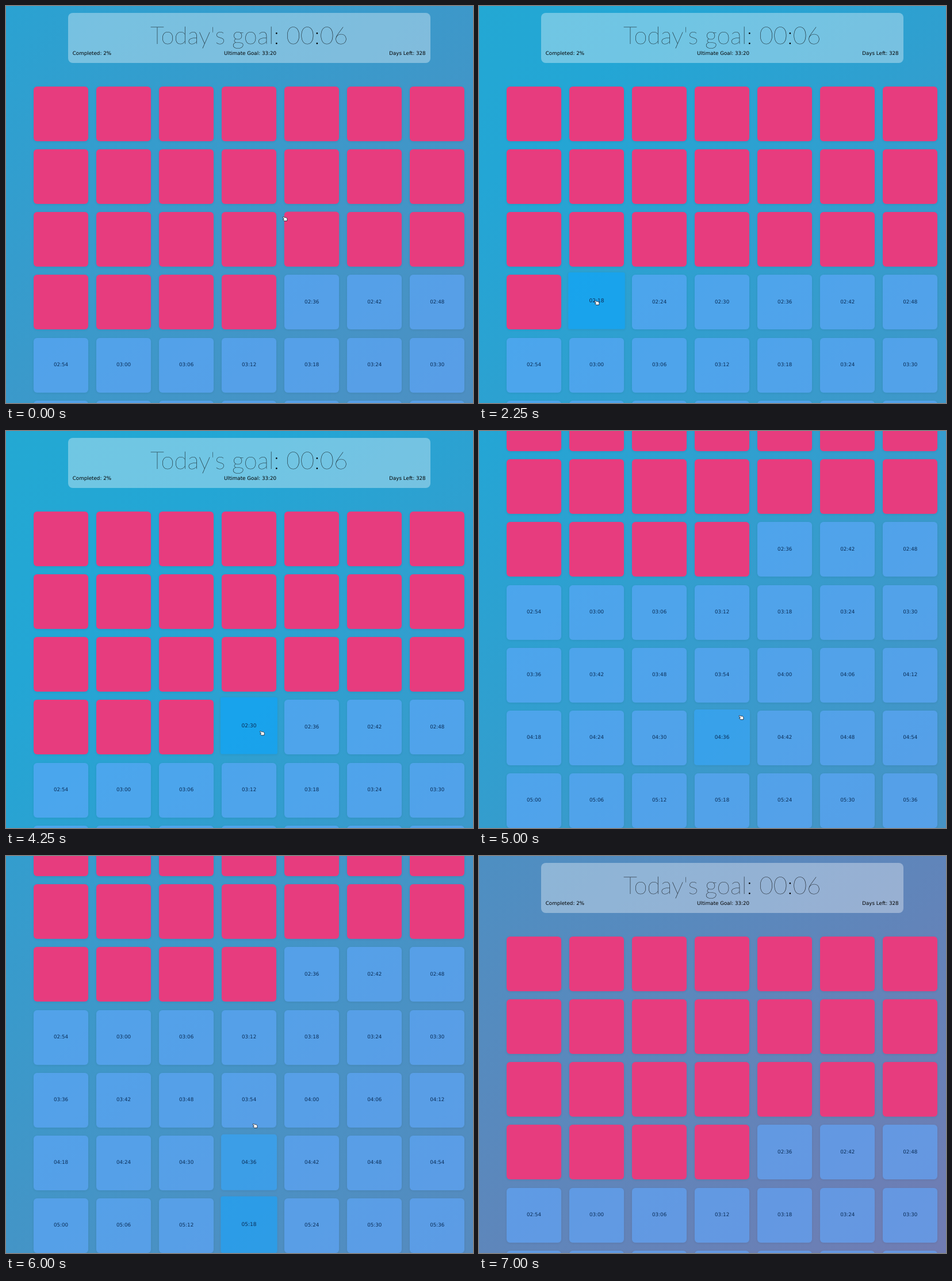
An HTML page for the animation above (7.25 s loop, 812x690 px).

```html
<!DOCTYPE html>
<html lang="en">
<head>
<meta charset="utf-8">
<title>Goal tracker</title>
<style>
  html, body { margin: 0; width: 100%; height: 100%; overflow: hidden; }
  #stage {
    position: relative; width: 812px; height: 690px; overflow: hidden;
    background: linear-gradient(-45deg, #ee7752, #e73c7e, #23a6d5, #23d5ab);
    background-size: 3380px 21560px;
    font: 8.75px "DejaVu Sans", sans-serif; text-rendering: geometricPrecision;
  }
  #page { position: absolute; inset: 0; }
  header {
    position: absolute; left: 107.7px; top: 11.5px; width: 630px; height: 87.6px;
    border-radius: 8px; background: rgba(255, 255, 255, .35); color: #000;
  }
  h1 {
    position: absolute; top: 12px; width: 100%; margin: 0; text-align: center;
    font: 100 42px/52.5px Lato, sans-serif;
  }
  .stats {
    position: absolute; left: 8px; right: 8px; top: 66.5px; line-height: 10px;
    display: flex; justify-content: space-between;
  }
  .tile {
    position: absolute; width: 95px; height: 95px; border-radius: 6px;
    display: flex; align-items: center; justify-content: center;
    color: #0a2d57; box-shadow: 0 1px 4px rgba(0, 0, 0, .07);
  }
  #cursor { position: absolute; left: 0; top: 0; }
</style>
</head>
<body>
<div id="stage">
  <div id="page">
    <header>
      <h1>Today's goal: 00:06</h1>
      <div class="stats"><span>Completed: 2%</span><span>Ultimate Goal: 33:20</span><span>Days Left: 328</span></div>
    </header>
  </div>
  <svg id="cursor" width="10" height="10">
    <path d="M1 2.2 Q1.2 1.2 2.4 1.6 L4.4 2.6 L7 2.6 Q9 3.6 9 5.5 L8.6 8.6 L4 8.6 L1.3 6.2 L3.4 5.6 Z"
      fill="#fff" stroke="#1d2a3a" stroke-width=".9" stroke-linejoin="round"/>
  </svg>
</div>
<script>
const LOOP = 7250, STEP = 250, COLUMNS = 7, DONE = 25;
const LEFT = 48, TOP = 140.3, PITCH = 109.05, SIZE = 95;
const FADE = 250, SCROLL = 309, SCROLL_START = 4600, SCROLL_END = 4930;
const PAUSE = 6000, RETURN = 6750, SKIPPED = 1900;
const TURN = 4400, HALF_CYCLE = 7500, TRAVEL = 2535;
const stage = document.getElementById('stage');
const page = document.getElementById('page');
const cursor = document.getElementById('cursor');

// Pointer stops: time, x, y; it speeds up towards each one
const stops = [
  [0, 485, 370], [1000, 428, 508], [1250, 339, 511], [2250, 205, 516], [3250, 310, 523],
  [3500, 215, 522], [4100, 445, 526], [5000, 456, 498], [5750, 427, 646], [6000, 433, 469]
];

const two = n => String(n).padStart(2, '0');
const mix = (a, b, k) => a + (b - a) * k;
const clamp = v => Math.min(1, Math.max(0, v));

// The CSS "ease" curve
function ease(x) {
  let lo = 0, hi = 1, s;
  for (let i = 0; i < 20; i++) {
    s = (lo + hi) / 2;
    if (.75 * s * (1 - s) + s ** 3 < x) lo = s; else hi = s;
  }
  return .3 * s * (1 - s) ** 2 + 3 * s * s * (1 - s) + s ** 3;
}

const tiles = Array.from({ length: 56 }, (_, i) => {
  const el = document.createElement('div'), minutes = (i + 1) * 6;
  el.className = 'tile';
  el.style.left = LEFT + i % COLUMNS * PITCH + 'px';
  el.style.top = TOP + Math.floor(i / COLUMNS) * PITCH + 'px';
  el.label = two(Math.floor(minutes / 60)) + ':' + two(minutes % 60);
  return page.appendChild(el);
});

function pointer(t) {
  let [x, y] = stops[0].slice(1);
  for (let i = 1; i < stops.length; i++) {
    const [from] = stops[i - 1], [to, nextX, nextY] = stops[i];
    const k = clamp((t - from) / (to - from)) ** 2;
    x = mix(x, nextX, k);
    y = mix(y, nextY, k);
  }
  return [x, y];
}

const scrollAt = t => t >= RETURN ? 0 :
  SCROLL * ease(clamp((t - SCROLL_START) / (SCROLL_END - SCROLL_START)));

// Tile under the pointer; none while the page scrolls
function hitAt(t) {
  if (t >= RETURN || (t > SCROLL_START && t < SCROLL_END)) return -1;
  const [x, y] = pointer(t), u = x - LEFT, v = y + scrollAt(t) - TOP;
  if (u < 0 || v < 0 || u % PITCH > SIZE || v % PITCH > SIZE) return -1;
  return Math.floor(v / PITCH) * COLUMNS + Math.floor(u / PITCH);
}

function hoverLevels(t) {
  const levels = tiles.map(() => 0), dt = 5;
  for (let s = -25; s < t; s += dt) {
    const hit = hitAt(s);
    levels.forEach((h, i) => { levels[i] = clamp(h + (i === hit ? dt : -dt) / FADE); });
  }
  return levels;
}

// The last three done tiles are cleared right to left, then ticked again left to right
function isDone(i, t) {
  const fromEnd = DONE - 1 - i;
  if (fromEnd < 0 || fromEnd > 2) return fromEnd > 2;
  return t < 1000 + 600 * fromEnd || t >= 4500 - 500 * fromEnd;
}

function render(t) {
  const scroll = scrollAt(t);
  const cycle = (t + (t >= RETURN ? SKIPPED : 0) - TURN) / HALF_CYCLE;
  const shift = cycle < 0 ? 1 - ease(1 + cycle) : ease(cycle);
  stage.style.backgroundPosition = `${-TRAVEL * shift}px ${-7860 - scroll}px`;
  page.style.transform = `translateY(${-scroll}px)`;

  const levels = hoverLevels(t);
  tiles.forEach((el, i) => {
    const h = levels[i] && ease(levels[i]), done = isDone(i, t);
    el.textContent = done ? '' : el.label;
    el.style.background = done ? '#e73c7e' : `rgba(${mix(97, 10, h)}, ${mix(168, 166, h)}, 255, .6)`;
    el.style.transform = h ? `translateY(${-2.3 * h}px) scale(${1 + .04 * h})` : '';
    el.style.borderRadius = mix(6, 3, h) + 'px';
    el.style.zIndex = h ? 1 : 0;
  });

  const [x, y] = pointer(t);
  cursor.style.transform = `translate(${x - 5}px, ${y - 5}px)`;
  cursor.style.display = t >= RETURN ? 'none' : '';
}

let shown = -1;
const start = performance.now();
function tick() {
  let t = Math.floor((performance.now() - start) % LOOP / STEP) * STEP;
  if (t > PAUSE && t < RETURN) t = PAUSE;
  if (t !== shown) render(shown = t);
  requestAnimationFrame(tick);
}
tick();
</script>
</body>
</html>
```
